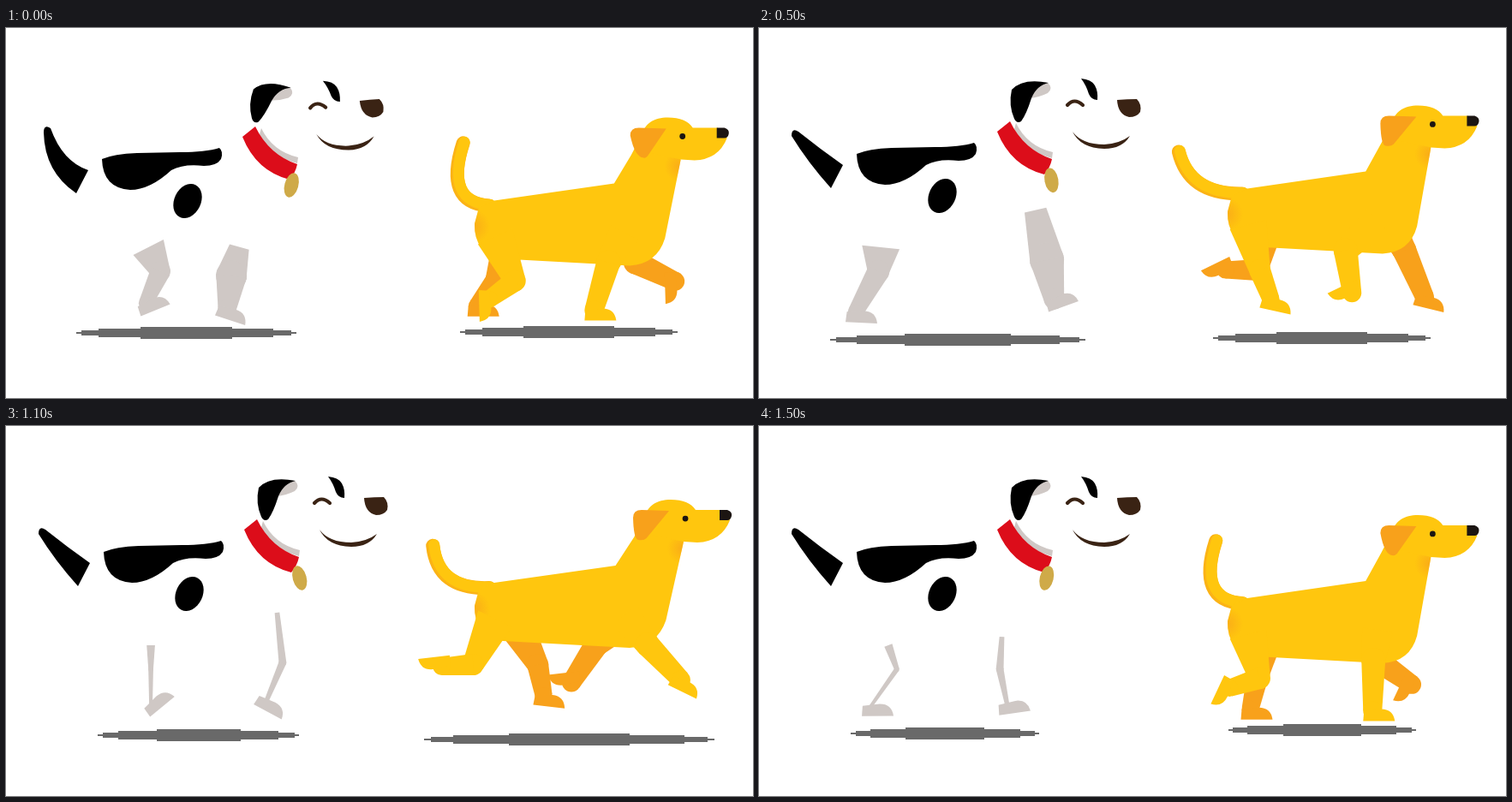
Write an HTML page with a canvas that moves like this. It is 872 by 432 pixels and loops after 1.6 s.

```html
<!DOCTYPE html>
<html lang="en">
<head>
<meta charset="utf-8">
<title>Two dogs walking</title>
<style>
html, body { margin: 0; width: 100%; height: 100%; overflow: hidden; background: #fff; }
canvas { display: block; }
</style>
</head>
<body>
<canvas id="stage" width="872" height="432"></canvas>
<script>
const ctx = document.getElementById('stage').getContext('2d');
const STEP = 100, CYCLE = 16, HALF = 8;
const YELLOW = '#ffc60e', ORANGE = '#f8a11b', GRAY = '#cfc8c5', BROWN = '#3a2314', DARK = '#1c1512';

const rad = deg => deg * Math.PI / 180;

// A cosine that is highest at step `peak`.
const wave = (t, mean, amp, peak, period = CYCLE) =>
  mean + amp * Math.cos(2 * Math.PI * (t - peak) / period);

// Point at a distance, with the angle counted forward from straight down.
const reach = ([x, y], deg, len) => [x + len * Math.sin(rad(deg)), y + len * Math.cos(rad(deg))];

function fill(d, color) {
  ctx.fillStyle = color;
  ctx.fill(new Path2D(d));
}

function line(d, color, width) {
  ctx.strokeStyle = color;
  ctx.lineWidth = width;
  ctx.lineCap = 'round';
  ctx.stroke(new Path2D(d));
}

function oval(x, y, rx, ry, color, deg = 0) {
  ctx.fillStyle = color;
  ctx.beginPath();
  ctx.ellipse(x, y, rx, ry, rad(deg), 0, 7);
  ctx.fill();
}

function turnAt(x, y, deg) {
  ctx.translate(x, y);
  ctx.rotate(rad(deg));
  ctx.translate(-x, -y);
}

function moved(x, y, draw) {
  ctx.save();
  ctx.translate(x, y);
  draw();
  ctx.restore();
}

function glow(x, y, r) {
  const g = ctx.createRadialGradient(x, y, 0, x, y, r);
  g.addColorStop(0, 'rgba(248,161,27,.7)');
  g.addColorStop(1, 'rgba(248,161,27,0)');
  ctx.fillStyle = g;
  ctx.fillRect(x - r, y - r, 2 * r, 2 * r);
}

// Tapered segments through joints [x, y, radius], rounded below the first.
function limb(joints, color) {
  for (let i = 1; i < joints.length; i++) {
    const [x0, y0, r0] = joints[i - 1], [x1, y1, r1] = joints[i];
    const d = Math.hypot(x1 - x0, y1 - y0);
    const nx = (y1 - y0) / d, ny = (x0 - x1) / d;
    fill(`M${x0 + nx * r0} ${y0 + ny * r0}L${x1 + nx * r1} ${y1 + ny * r1}` +
      `L${x1 - nx * r1} ${y1 - ny * r1}L${x0 - nx * r0} ${y0 - ny * r0}Z`, color);
    oval(x1, y1, r1, r1, color);
  }
}

function paw([x, y], deg, color) {
  moved(x, y, () => {
    ctx.rotate(rad(deg));
    fill('M-10 0L-11 12L26 12Q24 -2 10 -2Z', color);
  });
}

// The paw folds back at lift-off, then unrolls until it lands.
function pawTurn(t, shin) {
  const u = t % CYCLE;
  const curl = u < 2 ? 88 * u : 176 * (1 - ((u - 2) / 8.5) ** 2);
  return Math.max(0, curl, 0.6 * shin);
}

// Stacked strips give the stepped rim.
function shadow(x, y, width) {
  ctx.fillStyle = '#696969';
  for (let row = -3; row <= 3; row++) {
    const w = Math.round(width * Math.sqrt(1 - (row / 3.3) ** 2));
    ctx.fillRect(Math.round(x - w / 2), Math.round(y) + 2 * row - 1, w, 2);
  }
}

function frontLeg(t, dx, bob, color) {
  const elbow = [wave(t, 713 + dx, 36, 11.3), 260 + bob];
  const shin = wave(t, 16, 47.5, 9.4) + wave(t, 0, 11, 7, HALF);
  const ankle = reach(elbow, shin, wave(t, 55, -5, 6));
  limb([[722 + dx, 225 + bob, 18], [...elbow, 14], [...ankle, 11]], color);
  paw(ankle, pawTurn(t, shin), color);
}

function backLeg(t, dx, bob, color) {
  const knee = [wave(t, 573 + dx, 30, 2), 283 + 0.9 * bob];
  const shin = wave(t, -40, 57, 4.4) + wave(t, 0, 6, 4.5, HALF);
  const ankle = reach(knee, shin, 37);
  limb([[571 + dx, 230 + bob, 22], [...knee, 12.5], [...ankle, 10]], color);
  paw(ankle, pawTurn(t + HALF, shin), color);
}

function yellowTail(t, bob) {
  const tipX = wave(t, 505, 29, 15.6);
  const tipY = 130 + 0.36 * (535 - tipX) + 0.4 * (bob - 4);
  const bendX = 505 + 0.2 * (tipX - 505);
  const d = `M${tipX} ${tipY}Q${bendX} ${195 + 0.7 * bob} 564 ${194 + bob}`;
  line(d, '#fbb316', 16);
  moved(1.5, -1, () => line(d, YELLOW, 13));
}

function yellowDog(t) {
  const bob = wave(t, 4, 10, 7.6, HALF);
  const hx = wave(t, 3.7, 4.7, 2, HALF), hy = bob + 2;
  const ear = wave(t, 5, 5.5, 0, HALF);
  const y = v => v + bob;

  backLeg(t + HALF, 20, bob, ORANGE);
  frontLeg(t + HALF, 12, bob, ORANGE);
  yellowTail(t, bob);

  const body = `M552 ${y(196)}L570 ${y(188)}L${708 + hx / 2} ${y(168)}L${726 + hx} ${133 + hy}` +
    `L${740 + hx} ${106 + hy}L${784 + hx} ${138 + hy}L${768 + hx / 3} ${y(232)}` +
    `Q760 ${y(262)} 728 ${y(264)}L580 ${y(256)}Q546 ${y(250)} 547 ${y(215)}Z`;
  fill(body, YELLOW);
  ctx.save();
  ctx.clip(new Path2D(body));
  glow(545, y(218), 20);
  glow(783 + hx, 146 + hy, 18);
  ctx.restore();

  backLeg(t, 0, bob, YELLOW);
  frontLeg(t, 0, bob, YELLOW);

  moved(hx, hy, () => {
    fill('M739 110C741 96 753 89 769 89C783 89 793 93 798 101L827 101L838 113Q828 138 800 139L784 138L745 130Z', YELLOW);
    fill(`M725 110Q725 101 735 101L767 102L${740 + ear / 2} 134Q${737 + ear / 2} 137 ${730 + ear} 136Q${725 + ear / 2} 135 725 110Z`, ORANGE);
    oval(786, 111, 3.4, 3.4, DARK);
    fill('M826 101L835 101Q841 103 840 108Q839 113 835 113L826 113Z', DARK);
  });
}

// Gray far legs; they narrow while the near legs pass in front.
function grayLegs(t) {
  const w = (mean, amp, peak) => wave(t, mean, amp, peak, HALF);
  const slim = Math.min(1, wave(t, 0.9, 0.68, 1, HALF / 2));

  const backAnkle = [w(150, 42, 1.6), w(325, 7, 5.3)];
  limb([[w(160, 20, 1.6), 256, 22 * slim], [w(165, 26, 1.2), 284, 13 * slim], [...backAnkle, 9 * slim]], GRAY);
  paw(backAnkle, w(-20, -30, 1.9), GRAY);

  const frontAnkle = [w(297, 48, 4.8), w(322, -6, 4.5)];
  limb([[w(300, 28, 4.2), w(232, -24, 4.2), 13 * slim], [w(302, 40, 4.3), w(280, -10, 4.5), 20 * slim],
    [...frontAnkle, 12 * slim]], GRAY);
  paw(frontAnkle, w(10, 35, 1.7), GRAY);
}

function spottedTail(k, x, y) {
  const tipX = 41 - 6 * k, tipY = 122 + 4 * k;
  fill(`M${tipX + 5} ${tipY - 1}Q${71 + 5 * k} ${141 - 15 * k} ${98 + x} ${160 + y}L${84 + x} ${187 + y}` +
    `Q${57 + 12 * k} ${157 - 11 * k} ${tipX - 3} ${tipY + 4}Q${tipX - 3} ${tipY - 6} ${tipX + 5} ${tipY - 1}Z`, '#000');
}

function spottedDog(t) {
  // One nod per stride, then a rest.
  const k = (t + 1) % HALF < HALF / 2 ? -Math.cos(Math.PI * t / 2) : 0;
  const x = 2 * k, y = k * (2.5 * k - 3.5);

  grayLegs(t);
  spottedTail(k, x, y);

  moved(x, y, () => {
    fill('M114 147Q128 141 155 140L205 139Q235 139 251 134Q256 138 253 147Q248 155 233 155Q210 152 195 160Q170 183 147 183Q115 181 114 147Z', '#000');
    oval(214, 196, 15.5, 21, '#000', 26);
    fill('M300 111Q313 138 343 145L342 152Q309 143 298 118Z', GRAY);
    fill('M293 109L278 121Q294 161 333 171Q340 163 342 153Q309 142 293 109Z', '#dc0d1a');
    turnAt(339, 164, wave(t, -1, 17, 7.7, HALF));
    oval(339, 178, 8, 14.5, '#cfaa48');
  });

  moved(5 * k, 3 * k * k, () => {
    turnAt(369, 87, 2.3 * k);
    fill('M376 59Q388 60 392 67Q396 74 395 84Q388 84 385 77Q382 67 376 59Z', '#000');
    line('M360 90Q368 81 378 90', BROWN, 4.2);
    fill('M418 84Q430 83 441 83Q447 89 445 98Q441 104 432 104Q419 101 418 84Z', BROWN);
    fill('M366 121Q377 136 403 136Q421 135 433 126Q424 141 403 141Q375 140 366 121Z', BROWN);
    turnAt(330, 67, -10.5 * k);
    fill('M295 73Q308 59 337 64Q344 70 337 76Q327 81 316 82Z', GRAY);
    fill('M295 72Q308 58 338 64Q324 67 318 82Q312 101 306 109Q301 112 298 106Q291 90 295 72Z', '#000');
  });
}

function shadows(t) {
  const sway = wave(t, 0, 1, 4.6, HALF);
  shadow(221 + 12 * sway, 360 + 4 * sway, wave(t, 272, 50, 1.3, HALF / 2) + wave(t, 0, 20, 1.5, HALF));
  shadow(657, wave(t, 360.5, 6, 3.3, HALF), wave(t, 279, 65, 2.5, HALF));
}

function draw(now) {
  const t = Math.floor(now / STEP) % CYCLE;
  ctx.fillStyle = '#fff';
  ctx.fillRect(0, 0, 872, 432);
  shadows(t);
  spottedDog(t);
  yellowDog(t);
}

const start = performance.now();
function tick() {
  draw(performance.now() - start);
  requestAnimationFrame(tick);
}
tick();
</script>
</body>
</html>
```
